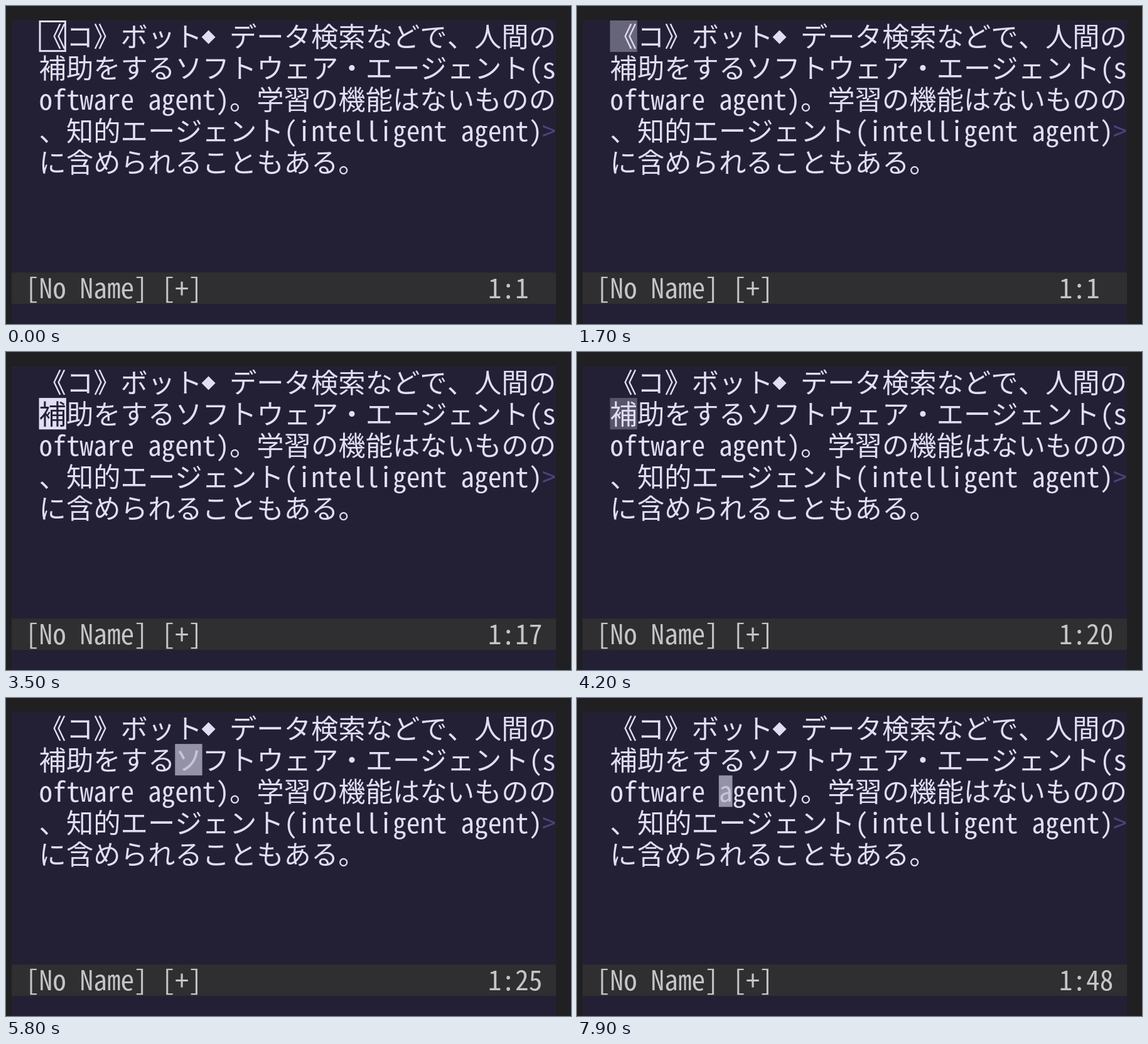
Animation of 900x506 px, one loop 8000 ms. Source, as an HTML page with a canvas:

```html
<!DOCTYPE html>
<html lang="ja">
<head>
<meta charset="utf-8">
<title>Editor cursor</title>
<style>
  html, body { margin: 0; height: 100%; overflow: hidden; background: #201f21; }
  canvas { display: block; }
</style>
</head>
<body>
<canvas id="stage" width="900" height="506"></canvas>
<script>
const ctx = document.getElementById('stage').getContext('2d');

const LOOP = 8000, STEP = 100;
const LEFT = 9.2, TOP = 23, CELL = 21.67, ROW = 50.1, BASELINE = 41.5;
const COLOR = {
  frame: '#201f21', back: '#232035', text: '#e0def4',
  bar: '#2f2e30', barText: '#c6c4c6', mark: '#49447c'
};

const LINES = [
  '《コ》ボット◆データ検索などで、人間の',
  '補助をするソフトウェア・エージェント(s',
  'oftware agent)。学習の機能はないものの',
  '、知的エージェント(intelligent agent)',
  'に含められることもある。'
];

// Cursor stops: time in ms and character column.
const STOPS = [[600, 1], [1900, 17], [3500, 20], [4400, 23], [5300, 25], [6200, 38], [7400, 48]];
const RULER_LAG = 100, BLINK_WAIT = 250, FADE = 625;

const cellsOf = char => char.charCodeAt(0) > 127 ? 2 : 1;

function layout(line, row, col) {
  return [...line].map(char => {
    const cell = { char, row, col, width: cellsOf(char) };
    col += cell.width;
    return cell;
  });
}

const body = LINES.flatMap((line, row) => layout(line, row, 2));
const title = layout('[No Name] [+]', 8, 1);
const wrapMark = layout('>', 3, 39);

function box({ row, col, width }) {
  return [LEFT + col * CELL, TOP + row * ROW, width * CELL, ROW];
}

function drawCell(cell, color) {
  const [x, y, w] = box(cell);
  ctx.fillStyle = color;
  if (cell.char === '◆') {
    const cx = x + 10, cy = y + 26.5, r = 11;
    ctx.beginPath();
    ctx.moveTo(cx, cy - r);
    ctx.lineTo(cx + r, cy);
    ctx.lineTo(cx, cy + r);
    ctx.lineTo(cx - r, cy);
    ctx.fill();
  } else {
    ctx.fillText(cell.char, x + w / 2, y + BASELINE);
  }
}

function drawCells(cells, color) {
  cells.forEach(cell => drawCell(cell, color));
}

function fillRect(color, x, y, w, h) {
  ctx.fillStyle = color;
  ctx.fillRect(x, y, w, h);
}

const stopAt = t => STOPS.findLast(([start]) => start <= t) || [0, 1];

// Opaque for a moment after each move, then a linear fade out and in.
function blink(age) {
  const phase = Math.max(0, age - BLINK_WAIT) / FADE % 2;
  return Math.abs(1 - phase);
}

function drawCursor(t) {
  const [start, column] = stopAt(t);
  const cell = body[column - 1];
  const [x, y, w, h] = box(cell);
  if (t < STOPS[0][0]) {
    ctx.strokeStyle = COLOR.text;
    ctx.lineWidth = 3;
    ctx.strokeRect(x + 1.5, y + 1.5, w - 3, h - 3);
    return;
  }
  const alpha = blink(t - start);
  ctx.globalAlpha = alpha;
  fillRect(COLOR.text, x, y, w, h);
  ctx.globalAlpha = alpha ** 4;
  drawCell(cell, COLOR.back);
  ctx.globalAlpha = 1;
}

function draw(t) {
  fillRect(COLOR.frame, 0, 0, 900, 506);
  fillRect(COLOR.back, 9, TOP, 867, 483);
  fillRect(COLOR.bar, 9, 424, 867, 50);
  ctx.font = `${CELL * 2}px "Noto Sans Mono CJK JP", "Noto Sans CJK JP", "Noto Sans CJK", monospace`;
  ctx.textAlign = 'center';
  drawCells(body, COLOR.text);
  drawCells(wrapMark, COLOR.mark);
  drawCells(title, COLOR.barText);
  drawCells(layout('1:' + stopAt(t - RULER_LAG)[1], 8, 35), COLOR.barText);
  drawCursor(t);
}

function tick() {
  const t = performance.now() % LOOP;
  draw(Math.floor(t / STEP) * STEP);
  requestAnimationFrame(tick);
}
tick();
</script>
</body>
</html>
```
